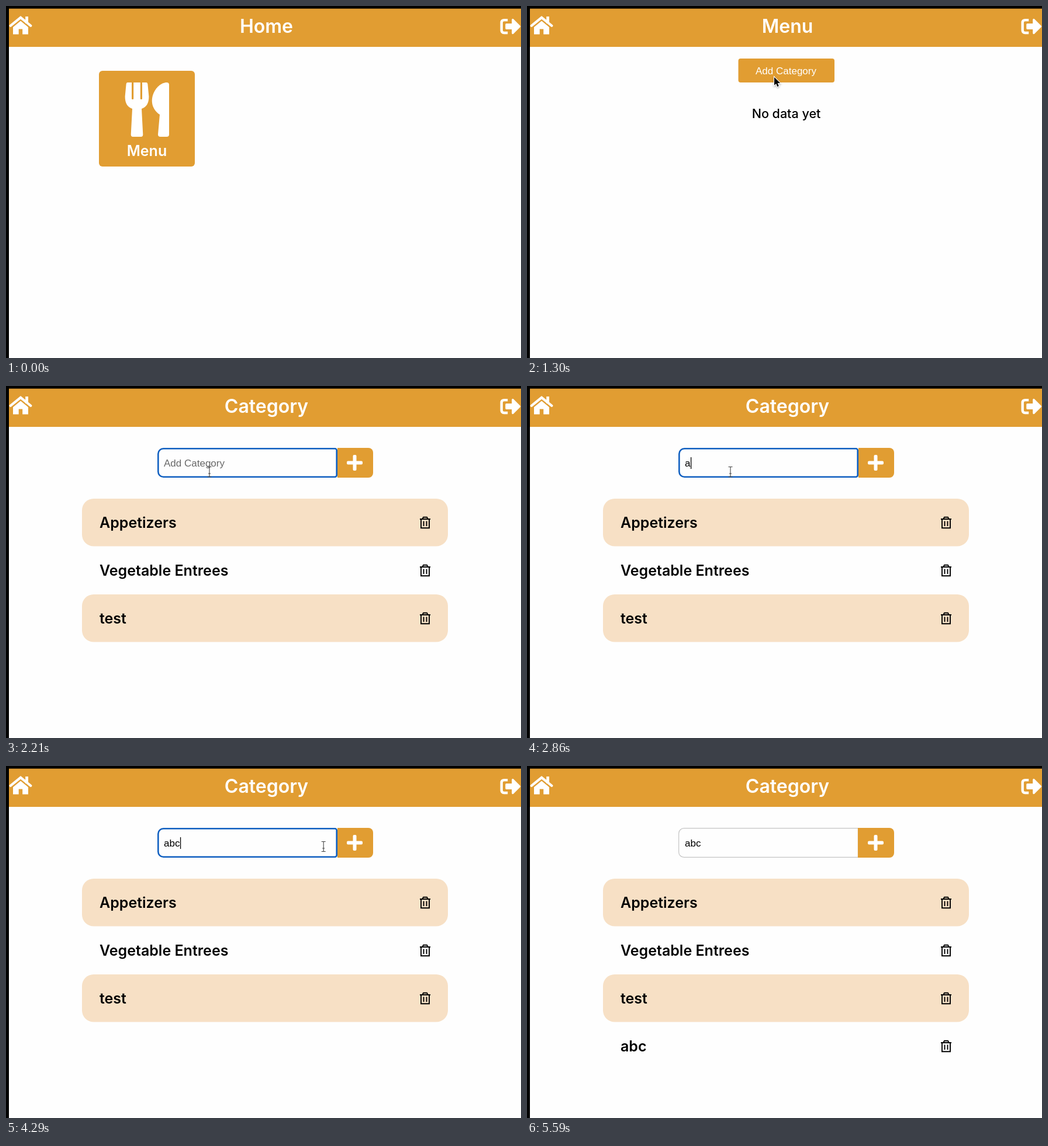
Recreate the animation shown at these times as an HTML page with a canvas. Size 881 by 603 pixels, loop 6110 ms.

```html
<!DOCTYPE html>
<html lang="en">
<head>
<meta charset="utf-8">
<title>Menu categories</title>
<style>
  html, body { margin: 0; width: 100%; height: 100%; overflow: hidden; background: #fefefe; }
  canvas { display: block; }
</style>
</head>
<body>
<canvas id="stage" width="881" height="603"></canvas>
<script>
const ctx = document.getElementById('stage').getContext('2d');
const LOOP = 6110, TICK = 130;
const ORANGE = '#e19d32', PEACH = '#f7e0c5', BLUE = '#0f5fc0';
const HEAD = 'Inter, "Open Sans", sans-serif';
const BODY = '17px "Liberation Sans", Arial, sans-serif';

// Moments of the story, in ms
const ENTER = 130, OPEN_MENU = 910, OPEN_CATEGORY = 1690, BLUR = 4550, ADDED = 4810, LEAVE = 5590;
const KEY_TIMES = [2860, 3640, 3900];

// Eased pointer moves
const MOVES = [
  { from: ENTER, to: 780, x: 258, y: 212 },
  { from: OPEN_MENU, to: 1300, x: 423, y: 122 },
  { from: OPEN_CATEGORY, to: 1950, x: 348, y: 147 },
  { from: 3510, to: 3770, x: 418, y: 138 },
  { from: 3770, to: BLUR, x: 587, y: 138 },
  { from: 5070, to: LEAVE, x: 655, y: 620 }
];

const HALF_FORK = new Path2D('M-.5 131H16Q18 131 18.4 134L20.4 155Q20.4 172 8 176L10.3 220Q10.3 224 7 224H-.5Z');
const KNIFE = new Path2D('M279 135V220Q279 224 275 224H264Q260 224 260 220L263 186C236 167 256 131 275 131Q279 131 279 135Z');
const HOUSE = new Path2D('M12 36.2 25 25.4 38 36.2V48.4H28.2V39.6H21.7V48.4H12ZM33.2 18H38V30H33.2Z');
const ROOF = new Path2D('M7.6 33.8 25 19.8 42.4 33.8');
const BRACKET = new Path2D('M186 96H96Q32 96 32 160V352Q32 416 96 416H186');
const EXIT_ARROW = new Path2D('M312 88V208H152V304H312V424L480 256Z');
const TRASH = new Path2D('M-9-6H9M-4.5-6.5-3-9.3H3L4.5-6.5M-7-6V9.3H7V-6M-2.5-2.5V6M2.5-2.5V6');
const ARROW = new Path2D('M0 0V16.5L3.8 13 6.4 19.2 9.2 18 6.6 12H12Z');
const IBEAM = new Path2D('M-3.5-8.5H3.5M0-8.5V8.5M-3.5 8.5H3.5M-2 3H2');

function box(x, y, w, h, radius, color) {
  ctx.beginPath();
  ctx.roundRect(x, y, w, h, radius);
  ctx.fillStyle = color;
  ctx.fill();
}

function frame(x, y, w, h, radius, color, width) {
  ctx.beginPath();
  ctx.roundRect(x + width / 2, y + width / 2, w - width, h - width, radius);
  ctx.strokeStyle = color;
  ctx.lineWidth = width;
  ctx.stroke();
}

function text(str, x, y, font, color, align = 'left') {
  ctx.font = font;
  ctx.fillStyle = color;
  ctx.textAlign = align;
  ctx.fillText(str, x, y);
}

function at(x, y, scaleX, scaleY, draw) {
  ctx.save();
  ctx.translate(x, y);
  ctx.scale(scaleX, scaleY);
  draw();
  ctx.restore();
}

function line(path, color, width) {
  ctx.strokeStyle = color;
  ctx.lineWidth = width;
  ctx.stroke(path);
}

function header(title) {
  box(5, 4.5, 876, 65.5, 0, ORANGE);
  text(title, 445.5, 46, `600 32px ${HEAD}`, '#fff', 'center');
  ctx.fill(HOUSE);
  ctx.lineCap = 'round';
  line(ROOF, '#fff', 4.2);
  ctx.lineCap = 'butt';
  at(845.5, 17.5, 0.0685, 0.0685, () => {
    line(BRACKET, '#fff', 64);
    ctx.lineJoin = 'round';
    line(EXIT_ARROW, '#fff', 48);
    ctx.fill(EXIT_ARROW);
  });
}

function home() {
  header('Home');
  box(159, 111, 164, 164, 6, ORANGE);
  ctx.fillStyle = '#fff';
  for (const side of [-1, 1]) at(224, 0, side, 1, () => ctx.fill(HALF_FORK));
  ctx.fill(KNIFE);
  for (const x of [215, 229.8]) box(x, 130, 3.2, 30, 1.5, ORANGE);
  text('Menu', 241, 257, `600 25px ${HEAD}`, '#fff', 'center');
}

function menu() {
  header('Menu');
  box(361.5, 90, 164.5, 41, 4, ORANGE);
  text('Add Category', 443, 117, BODY, '#fff', 'center');
  text('No data yet', 443.5, 191.5, `500 21.5px ${HEAD}`, '#000', 'center');
}

function input(t) {
  const pressed = KEY_TIMES.filter(key => t >= key);
  const typed = 'abc'.slice(0, pressed.length);
  const blinkStart = pressed.at(-1) || OPEN_CATEGORY;
  const focused = t < BLUR;

  if (focused) frame(259, 106, 308, 51, [9, 3, 3, 9], BLUE, 2.6);
  else frame(259, 106, 308, 51, [9, 0, 0, 9], '#c4c4c4', 1.2);
  const left = focused ? 567 : 566;
  box(left, 106, 628 - left, 51, [0, 8, 8, 0], ORANGE);
  box(583, 128.5, 27, 6, 2, '#fff');
  box(593.5, 118, 6, 27, 2, '#fff');

  text(typed || 'Add Category', 270, 138, BODY, typed ? '#000' : '#686868');
  if (focused && (t - blinkStart) % 1040 < 520) {
    const caret = 270.5 + (typed ? ctx.measureText(typed).width : 0);
    box(caret, 122, 1.3, 20, 0, '#000');
  }
}

function category(t) {
  header('Category');
  input(t);
  const rows = ['Appetizers', 'Vegetable Entrees', 'test'];
  if (t >= ADDED) rows.push('abc');
  rows.forEach((name, i) => {
    const y = 193 + 82 * i;
    if (i % 2 === 0) box(130, y, 626, 81.5, 20, PEACH);
    text(name, 160, y + 50, `600 25px ${HEAD}`, '#000');
    at(717, y + 41, 1, 1, () => line(TRASH, '#000', 1.9));
  });
}

function pointer(t) {
  if (t < ENTER || t >= LEAVE) return;
  let x = 335, y = 595;
  for (const move of MOVES) {
    const k = Math.min(1, Math.max(0, (t - move.from) / (move.to - move.from)));
    const ease = k * k * (3 - 2 * k);
    x += (move.x - x) * ease;
    y += (move.y - y) * ease;
  }
  const overInput = t > OPEN_CATEGORY && x > 259 && x < 566 && y > 106 && y < 157;
  if (overInput) at(x, y, 1, 1, () => line(IBEAM, '#444', 1.1));
  else at(x, y, 0.84, 0.84, () => {
    ctx.shadowColor = 'rgba(0,0,0,.3)';
    ctx.shadowBlur = 3;
    ctx.shadowOffsetY = 1.5;
    line(ARROW, '#fff', 2.6);
    ctx.shadowColor = 'transparent';
    ctx.fillStyle = '#000';
    ctx.fill(ARROW);
  });
}

function render(now) {
  const t = Math.floor(now % LOOP / TICK) * TICK;
  box(0, 0, 881, 603, 0, '#000');
  box(5, 70, 876, 533, 0, '#fefefe');
  if (t < OPEN_MENU) home();
  else if (t < OPEN_CATEGORY) menu();
  else category(t);
  pointer(t);
}

const start = performance.now();
function loop() {
  render(performance.now() - start);
  requestAnimationFrame(loop);
}
loop();
</script>
</body>
</html>
```
